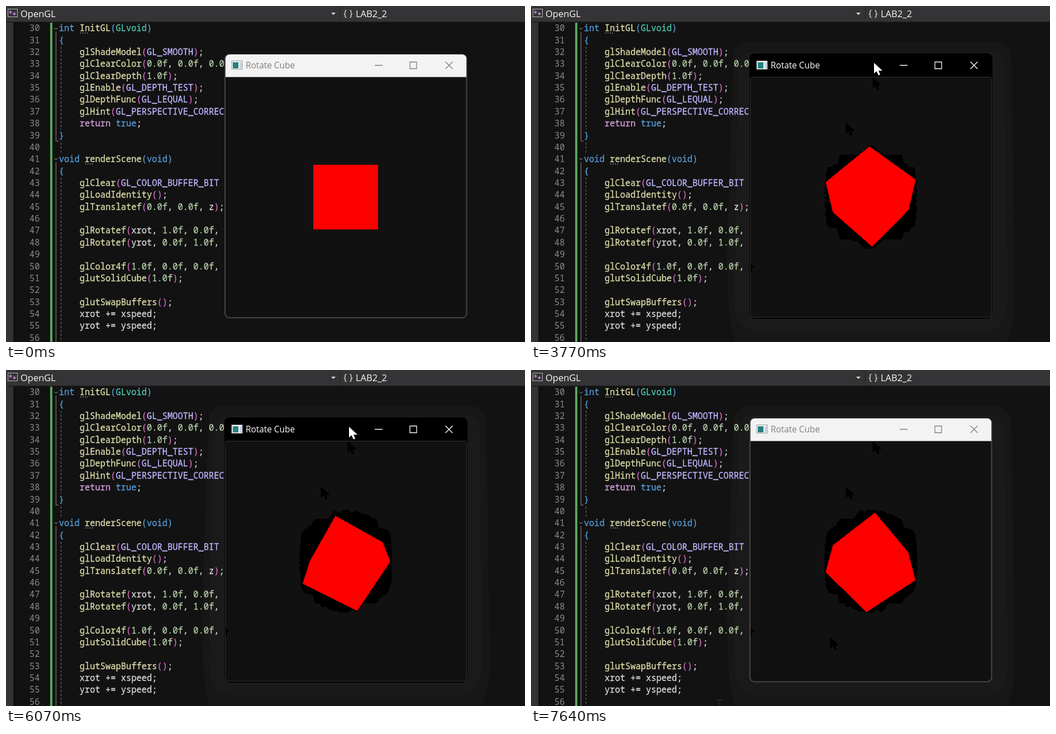
Write an HTML page that moves like this. It is 929 px wide and 603 px high and loops after 7690 ms.

```html
<!DOCTYPE html>
<html>
<head>
<meta charset="utf-8">
<title>Rotate Cube</title>
<style>
html, body { margin: 0; width: 100%; height: 100%; overflow: hidden; background: #121212; }
svg { display: block; width: 929px; height: 603px; }
text { white-space: pre; font-family: 'Open Sans', sans-serif; }
#code text { font: 15.41px 'Noto Sans Mono', monospace; stroke-width: .3px; }
.crisp { shape-rendering: crispEdges; }
</style>
</head>
<body>
<svg viewBox="0 0 929 603">
  <defs>
    <path id="arrow" d="M0 0V19L4.5 15L8 22.5L11 21L8 14H15Z"/>
    <path id="beam" d="M-6 -5H-1L0 -4L1 -5H6M0 -4V8"/>
    <clipPath id="client"><rect x="393" y="128" width="431" height="430"/></clipPath>
    <g id="title">
      <rect x="404" y="98.5" width="19" height="15" fill="#f4f4f4" stroke="#999"/>
      <rect x="406" y="101" width="10" height="11" fill="#24827f"/>
      <rect x="418" y="101" width="4" height="11" fill="#c4d4e4"/>
      <text x="429" y="112.3" font-size="15.4" fill="currentColor">Rotate Cube</text>
      <path d="M660 106.5H674M723 100.500H735V112.500H723ZM786.500 100L799.500 113M799.500 100L786.500 113" fill="none" stroke="currentColor" stroke-width="1.3"/>
    </g>
  </defs>

  <rect width="929" height="603" fill="#121212"/>
  <g id="halo">
    <path fill="#171717" d="M392 64H825Q858 64 860 95L866 520Q866 580 850 603H365Q350 560 351 440L362 95Q364 64 392 64Z"/>
    <path fill="#1a1a1a" d="M398 82H820Q846 82 848 110L853 520Q853 580 820 583H405Q362 583 363 520L371 110Q372 82 398 82Z"/>
  </g>
  <rect y="28" width="13" height="575" fill="#333"/>
  <rect width="929" height="29" fill="#343436"/>
  <rect y="28" width="929" height="1.500" fill="#1c1c1c"/>
  <path d="M598.500 0V28" stroke="#222"/>
  <g fill="none" stroke="#b9b9b9">
    <rect x="3.500" y="5.500" width="17" height="14"/>
    <path stroke="#c586d8" stroke-width="1.500" d="M5 11H11M8 8V14M12 14H18M15 11V17"/>
  </g>
  <path d="M582 12H590L586 16Z" fill="#ddd"/>
  <g fill="#fafafa" font-size="16.5">
    <text x="26" y="19.500">OpenGL</text>
    <text x="604" y="18.500" fill="#e4e4e4">{ }</text>
    <text x="626" y="19.500">LAB2_2</text>
  </g>

  <rect x="79" y="30" width="4" height="573" fill="#57a65a"/>
  <g fill="none" stroke="#8a8a8a">
    <path d="M89.500 46V242.500H94M89.500 280V603"/>
    <path stroke="#aaa" d="M86.500 39L89.500 42L92.500 39M86.500 273L89.500 276L92.500 273"/>
    <path stroke="#777" stroke-dasharray="4 3" d="M98.500 73V222M98.500 245V263M98.500 308V603"/>
    <path stroke="#aaa" stroke-width="1.500" stroke-dasharray="1.500 2.500" d="M133 48.500H148M142 283.500H158"/>
  </g>
  <g id="code"></g>

  <g>
    <rect x="392" y="87" width="432.500" height="472.500" rx="8" fill="#111" stroke="#474747" stroke-width="2"/>
    <path d="M393 127.500V95Q393 87 401 87H816Q824 87 824 95V127.500Z" fill="#f3f3f3"/>
    <use href="#title" color="#808080"/>
  </g>
  <g id="active">
    <rect x="391" y="85" width="435" height="476" rx="9"/>
    <rect x="392.500" y="127.500" width="432" height="431" rx="3" fill="#111" stroke="#333"/>
    <use href="#title" color="#fff"/>
  </g>
  <g clip-path="url(#client)">
    <g id="ghosts"></g>
    <path id="trail" class="crisp" stroke="#000" stroke-width="3"/>
    <path id="cube" class="crisp" fill="#f00"/>
  </g>
  <use id="pointer" href="#arrow" fill="#fff" stroke="#000" stroke-width="2" paint-order="stroke"/>
  <use id="caret" href="#beam" fill="none" stroke-width="2"/>
</svg>
<script>
const $ = id => document.getElementById(id);
const LOOP = 7690;

// ---- editor text ----
const source = `int InitGL(GLvoid)
{
    glShadeModel(GL_SMOOTH);
    glClearColor(0.0f, 0.0f, 0.0f, 0.5f);
    glClearDepth(1.0f);
    glEnable(GL_DEPTH_TEST);
    glDepthFunc(GL_LEQUAL);
    glHint(GL_PERSPECTIVE_CORRECTION_HINT, GL_NICEST);
    return true;
}

void renderScene(void)
{
    glClear(GL_COLOR_BUFFER_BIT | GL_DEPTH_BUFFER_BIT);
    glLoadIdentity();
    glTranslatef(0.0f, 0.0f, z);

    glRotatef(xrot, 1.0f, 0.0f, 0.0f);
    glRotatef(yrot, 0.0f, 1.0f, 0.0f);

    glColor4f(1.0f, 0.0f, 0.0f, 1.0f);
    glutSolidCube(1.0f);

    glutSwapBuffers();
    xrot += xspeed;
    yrot += yspeed;
`;
const token = /(\b(?:int|void|true)\b)|(\breturn\b)|(GLvoid)|(\bGL_\w+)|(\b\d[\d.]*f?)|(\w+(?=\())|([(){}])|([^\w(){}]+|\w+)/g;
const colors = ['#569cd6', '#d8a0df', '#4ec9b0', '#beb7ff', '#b5cea8', '#dcdcaa', '', '#d8d8d8'];

function paint(line) {
  const bracket = line[0] === ' ' ? '#d568c6' : '#569cd6';
  return line.replace(token, (all, ...groups) => {
    const color = colors[groups.slice(0, 8).findIndex(g => g !== undefined)] || bracket;
    return `<tspan fill="${color}" stroke="${color}">${all}</tspan>`;
  });
}
$('code').innerHTML = source.split('\n').map((line, i) => {
  const y = Math.round(45.2 + 21.37 * i);
  return `<text x="42" y="${y}" fill="#8a8a8a">${30 + i}</text><text x="94.800" y="${y}">${paint(line)}</text>`;
}).join('');

// ---- cube ----
function at(keys, t) {
  if (t <= keys[0][0]) return keys[0][1];
  for (let i = 1; i < keys.length; i++) {
    const [t0, a] = keys[i - 1], [t1, b] = keys[i];
    if (t <= t1) return a + (b - a) * (t - t0) / (t1 - t0);
  }
  return keys[keys.length - 1][1];
}
const xrot = [[1116, 0], [1908, 378], [2656, 750], [3196, 750], [4384, 1184], [5264, 1610],
  [6056, 2091], [6936, 2430], [7640, 2818]];
const yrot = [[1840, 0], [1970, 43], [4400, 43], [5220, 119.7], [6950, 119.7], [7640, 141]];

// Projected outline: rotate about y, then x, view from 5 units with a 45 degree lens
function outline(xDeg, yDeg) {
  const a = xDeg * Math.PI / 180, b = yDeg * Math.PI / 180;
  const focal = 216 / Math.tan(Math.PI / 8), pts = [];
  for (let i = 0; i < 8; i++) {
    const [x, y, z] = [1, 2, 4].map(bit => i & bit ? 0.5 : -0.5);
    const u = x * Math.cos(b) + z * Math.sin(b), w = z * Math.cos(b) - x * Math.sin(b);
    const v = y * Math.cos(a) - w * Math.sin(a), d = 5 - y * Math.sin(a) - w * Math.cos(a);
    pts.push([608.3 + focal * u / d, 343.2 - focal * v / d]);
  }
  pts.sort((p, q) => p[0] - q[0] || p[1] - q[1]);
  const half = list => {
    const hull = [];
    for (const p of list) {
      while (hull.length > 1) {
        const [o, q] = hull.slice(-2);
        if ((q[0] - o[0]) * (p[1] - o[1]) - (q[1] - o[1]) * (p[0] - o[0]) > 0) break;
        hull.pop();
      }
      hull.push(p);
    }
    return hull.slice(0, -1);
  };
  const hull = [...half(pts), ...half(pts.slice().reverse())];
  return 'M' + hull.map(p => p.map(n => n.toFixed(1)).join(' ')).join('L') + 'Z';
}
const poses = [];
const addPose = t => poses.push({ t, d: outline(at(xrot, t), at(yrot, t)) });
addPose(0);
for (let t = 1160; t <= 2656; t += 44) addPose(t);
for (let t = 3240; t <= 7640; t += 44) addPose(t);

// ---- pointer: time, x, y, shape ----
const stops = [[0, 0, 0, ''], [30, 373, 460, 'beam'], [80, 385, 455, 'arrow'], [140, 564, 210, 'arrow'],
  [190, 612, 128, 'arrow'], [250, 617, 97, 'arrow'], [310, 614, 102, 'arrow'],
  [6790, 536, 480, 'arrow'], [6850, 338, 597, 'beam'], [7140, 338, 597, 'faint']];
const ghosts = [2, 3, 4, 7].map(i => {
  const [, x, y] = stops[i];
  $('ghosts').insertAdjacentHTML('beforeend', `<use href="#arrow" x="${x}" y="${y}" stroke="#000"/>`);
  return { el: $('ghosts').lastChild, from: stops[i + 1][0] };
});

const show = (el, on) => el.setAttribute('visibility', on ? 'visible' : 'hidden');
const fade = (t, start) => Math.max(0, Math.min(4, Math.floor((t - start) / 50) + 1)) / 4;
let lastPose = -1;

function draw(t) {
  const n = poses.findLastIndex(p => p.t <= t);
  if (n !== lastPose) {
    $('cube').setAttribute('d', poses[n].d);
    $('trail').setAttribute('d', poses.slice(0, n).map(p => p.d).join(''));
    lastPose = n;
  }
  const focus = fade(t, 470);
  $('active').setAttribute('opacity', focus - fade(t, 7390));
  $('halo').setAttribute('opacity', focus);

  const [, x, y, shape] = stops[stops.findLastIndex(s => s[0] <= t)];
  const place = `translate(${x} ${y})`;
  $('pointer').setAttribute('transform', place);
  $('caret').setAttribute('transform', place);
  $('caret').setAttribute('stroke', shape === 'faint' ? '#242424' : '#eee');
  show($('pointer'), shape === 'arrow');
  show($('caret'), shape === 'beam' || shape === 'faint');
  for (const g of ghosts) show(g.el, t >= g.from);
}
const begin = performance.now();
function tick() {
  draw((performance.now() - begin) % LOOP);
  requestAnimationFrame(tick);
}
tick();
</script>
</body>
</html>
```
